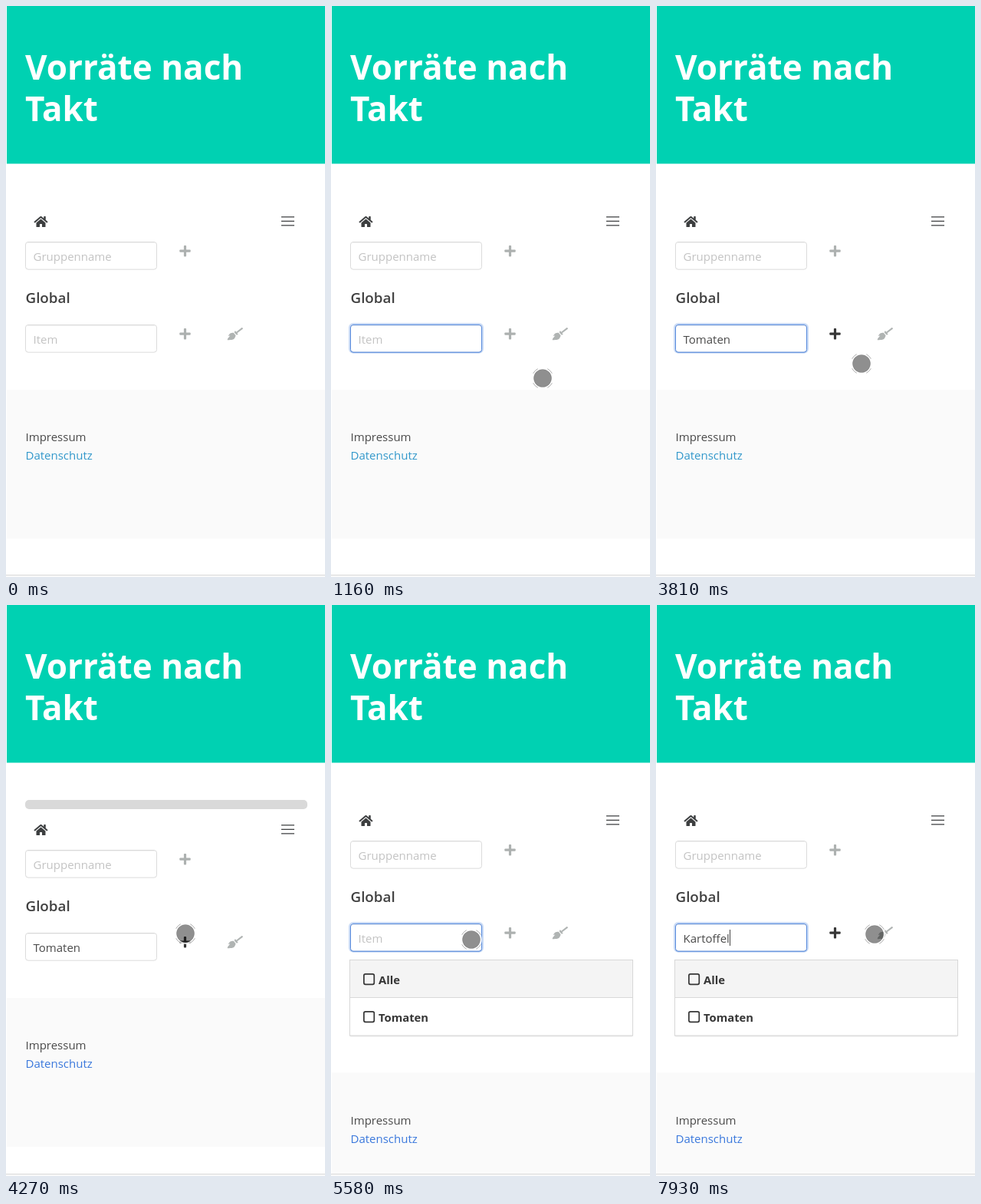
An HTML page for the animation above (8 s loop, 416 px wide and 744 px high).

```html
<!DOCTYPE html>
<html lang="de">
<head>
<meta charset="utf-8">
<style>
  html, body { margin: 0; width: 100%; height: 100%; overflow: hidden; background: #fff; }
  svg { display: block; width: 416px; height: 744px; }
  text { font: 15px "Open Sans", "Noto Sans", sans-serif; fill: #4a4a4a; font-variant-ligatures: none; white-space: pre; }
  .title { font-size: 44px; font-weight: 700; fill: #fff; }
  .group { font-size: 18.8px; font-weight: 600; fill: #404040; }
  .row { font-size: 14.8px; font-weight: 700; fill: #363636; }
  .hint { fill: #c3c3c3; }
  .field { fill: #fff; stroke: #dbdbdb; }
  .inset { fill: none; stroke: #f1f1f1; }
  .line { fill: none; stroke: currentColor; }
</style>
</head>
<body>
<svg viewBox="0 0 416 744">
  <defs>
    <g id="plus" fill="currentColor">
      <rect x="-7.2" y="-1.6" width="14.4" height="3.2" rx="1"/>
      <rect x="-1.6" y="-7.2" width="3.2" height="14.4" rx="1"/>
    </g>
    <g id="input">
      <rect class="field" x=".5" y=".5" width="171" height="35.7" rx="3.5"/>
      <path class="inset" d="M3 1.5H169"/>
    </g>
    <rect id="box" class="line" x="42.9" y="-6.6" width="13.4" height="13.4" rx="2" stroke-width="1.7"/>
  </defs>

  <rect x="1" width="415" height="205.5" fill="#00d1b2"/>
  <text class="title" x="25" y="96">Vorräte nach</text>
  <text class="title" x="25" y="150">Takt</text>

  <rect id="bar" x="25" y="254" width="368" height="12" rx="5" fill="#d9d9d9"/>

  <g id="content">
    <g color="#3d3f40">
      <g transform="translate(36.5 273) scale(.03125)" fill="currentColor">
        <path d="M288 145L96 300V464q0 16 16 16H224q16 0 16-16V368q0-16 16-16h64q16 0 16 16v96q0 16 16 16H464q16 0 16-16V300z"/>
        <path d="M572 252L488 182V44q0-12-12-12H420q-12 0-12 12v73L318 43q-30-22-61 0L4 252q-8 7-2 17l26 31q8 9 17 2L280 107q8-5 15 0L531 301q9 7 17-2l26-31q6-9-2-16z"/>
      </g>
      <path class="line" d="M359 274.9h17M359 280.4h17M359 285.9h17" stroke-width="1.1"/>
    </g>
    <use href="#input" x="25" y="307"/>
    <text class="hint" x="35.5" y="332">Gruppenname</text>
    <use href="#plus" x="233.5" y="319.2" color="#adb1b0"/>
    <text class="group" x="25.5" y="387">Global</text>

    <use href="#input" x="25" y="415"/>
    <g id="focus" fill="none" stroke="#3273dc">
      <rect x="24" y="414" width="174" height="37.7" rx="5" stroke-opacity=".25" stroke-width="2"/>
      <rect x="25.5" y="415.5" width="171" height="35.7" rx="3.5" stroke-opacity=".8"/>
    </g>
    <text id="item" x="35.5" y="440"></text>
    <rect id="caret" y="423" width="1" height="21" fill="#444"/>
    <use id="add" href="#plus" x="233.5" y="427.2"/>
    <g transform="translate(288.7 419) scale(.03165)" fill="#b0b4b3">
      <path d="M256 217l87 109s-17 102-76 150C207 524 0 510 0 510s4-23 11-55l95-112c4-5-1-12-7-10l-60 22c14-41 33-80 55-97 60-48 162-41 162-41z"/>
      <path d="M637 31L617 6q-10-11-23-3L362 181l-34-43q-11-10-19 2l-25 55 87 109 59-12q14-5 7-17l-34-43L635 54q9-10 2-23z"/>
    </g>
  </g>

  <g id="list">
    <rect x="24" y="462.5" width="370" height="100" rx="2" fill="#000" opacity=".09"/>
    <rect x="24.5" y="462.5" width="369" height="98.5" fill="#fff" stroke="#d8d8d8"/>
    <rect x="25" y="463" width="368" height="48" fill="#f4f4f4"/>
    <path d="M25 511.5H393" stroke="#d9d9d9"/>
    <g color="#363636"><use href="#box" y="487.5"/><use href="#box" y="536.5"/></g>
    <text class="row" x="62" y="494">Alle</text>
    <text class="row" x="62" y="543">Tomaten</text>
  </g>

  <g id="footer">
    <rect x="1" y="500" width="415" height="194" fill="#fafafa"/>
    <text x="25.5" y="567">Impressum</text>
    <text id="link" x="25.5" y="591">Datenschutz</text>
  </g>
  <rect y="741" width="416" height="3" fill="#f8f8f8"/>
  <path d="M0 741.5H416" stroke="#dadada"/>

  <g id="pointer">
    <circle r="12.8" fill="none" stroke="#fff" stroke-opacity=".8" stroke-width="2.2"/>
    <circle r="13.8" fill="none" stroke="#999" stroke-width=".8" pathLength="8" stroke-dasharray=".8 1.2" stroke-dashoffset="-.6"/>
    <circle r="11.6" fill="#000" fill-opacity=".44" stroke="#000" stroke-opacity=".12"/>
  </g>
</svg>
<script>
const LOOP = 8000, FRAME = 76;
const $ = id => document.getElementById(id);

// Each entry: [start time, value], held until the next entry
const typed = [
  [0, ''], [2310, 'T'], [2560, 'To'], [2710, 'Tom'], [2780, 'Toma'], [3030, 'Tomat'],
  [3110, 'Tomate'], [3260, 'Tomaten'], [4800, ''], [6370, 'K'], [6510, 'Ka'], [6760, 'Kar'],
  [6990, 'Kart'], [7140, 'Karto'], [7460, 'Kartof'], [7610, 'Kartoff'], [7780, 'Kartoffe'], [7930, 'Kartoffel']
];
const caretOn = [[0, false], [690, true], [1080, false], [1700, true], [2160, false], [2310, true],
  [3790, false], [5030, true], [5560, false], [6080, true]];
const focused = [[0, false], [690, true], [4190, false], [4950, true]];
const addReady = [[0, false], [2390, true], [4800, false], [6440, true]];
const phase = [[0, 'empty'], [4260, 'loading'], [4800, 'filled']];

// Pointer stops: time, x, y
const path = [
  [80, 100, 580], [310, 162, 482], [540, 198, 435], [920, 198, 435], [1160, 276, 485], [1300, 287, 493],
  [3740, 287, 493], [3810, 268, 466], [4110, 234, 428], [4495, 234, 428], [4730, 158, 434],
  [4950, 183, 436], [5585, 183, 436], [5660, 285, 429]
];

const held = (track, t) => track.findLast(([start]) => start <= t)[1];
const show = (id, visible) => $(id).setAttribute('visibility', visible ? 'visible' : 'hidden');
const move = (id, x, y) => $(id).setAttribute('transform', `translate(${x} ${y})`);

function pointerAt(t) {
  const i = path.findLastIndex(([start]) => start <= t);
  if (i < 0) return null;
  const [t0, x0, y0] = path[i], [t1, x1, y1] = path[i + 1] || [LOOP, x0, y0];
  const k = Math.floor((t - t0) / FRAME) * FRAME / (t1 - t0);
  return [x0 + (x1 - x0) * k, y0 + (y1 - y0) * k];
}

function draw(t) {
  const text = held(typed, t), state = held(phase, t), item = $('item');
  item.textContent = text || 'Item';
  item.setAttribute('class', text ? '' : 'hint');
  $('caret').setAttribute('x', Math.round(35.5 + (text ? item.getComputedTextLength() : 0)));
  show('caret', held(caretOn, t));
  show('focus', held(focused, t));
  $('add').setAttribute('color', held(addReady, t) ? '#363636' : '#adb1b0');

  show('bar', state === 'loading');
  show('list', state === 'filled');
  move('content', 0, state === 'loading' ? 12 : 0);
  move('footer', 0, { empty: 0, loading: 12, filled: 109.5 }[state]);
  $('link').style.fill = state === 'empty' ? '#3298cb' : '#3a78dc';

  const spot = pointerAt(t);
  show('pointer', spot);
  if (spot) move('pointer', ...spot);
}

const begin = performance.now();
function tick() {
  draw((performance.now() - begin) % LOOP);
  requestAnimationFrame(tick);
}
tick();
</script>
</body>
</html>
```
